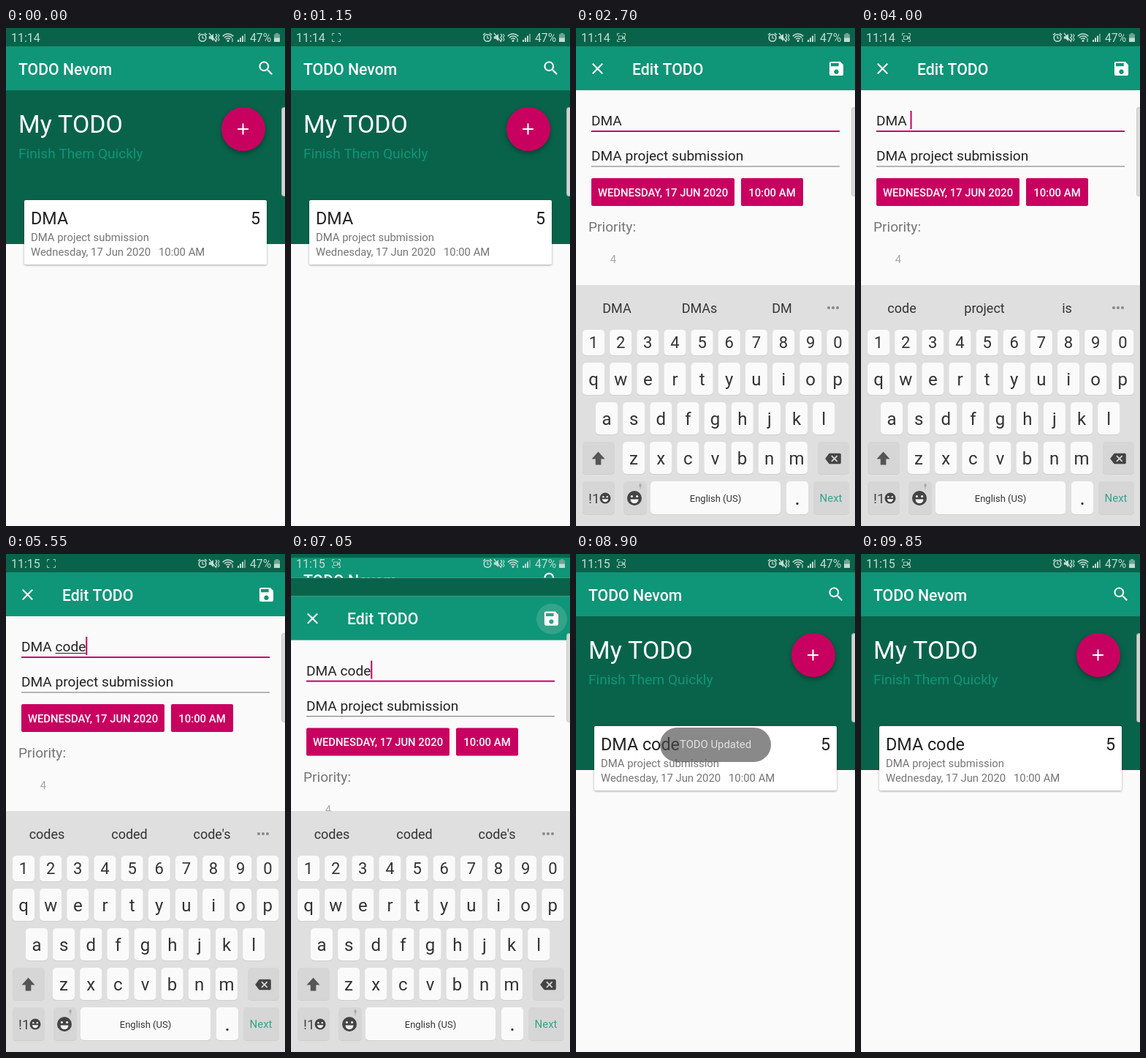
An HTML page with a canvas for the animation above (10 s loop, 382 by 680 pixels).

```html
<!DOCTYPE html>
<html lang="en">
<head>
<meta charset="utf-8">
<title>TODO app</title>
<style>
html, body { margin: 0; width: 100%; height: 100%; overflow: hidden; background: #fafafa; }
canvas { display: block; }
</style>
</head>
<body>
<canvas id="stage" width="382" height="680"></canvas>
<script>
const c = document.getElementById('stage').getContext('2d');
const LOOP = 10000;
const DARK = '#09634a', TEAL = '#0f9577', PINK = '#c80060', PAPER = '#fafafa', GREY = '#757575', INK = '#212121';
const SP = 1.0611; // pixels per density-independent unit

const ICONS = {
  search: 'M15.5 14h-.79l-.28-.27C15.41 12.59 16 11.11 16 9.5 16 5.91 13.09 3 9.5 3S3 5.91 3 9.5 5.91 16 9.5 16c1.61 0 3.09-.59 4.23-1.57l.27.28v.79l5 4.99L20.49 19l-4.99-5zm-6 0C7.01 14 5 11.99 5 9.5S7.01 5 9.5 5 14 7.01 14 9.5 11.99 14 9.5 14z',
  save: 'M17 3H5c-1.11 0-2 .9-2 2v14c0 1.1.89 2 2 2h14c1.1 0 2-.9 2-2V7l-4-4zm-5 16c-1.66 0-3-1.34-3-3s1.34-3 3-3 3 1.34 3 3-1.34 3-3 3zm3-10H5V5h10v4z',
  close: 'M19 6.41L17.59 5 12 10.59 6.41 5 5 6.41 10.59 12 5 17.59 6.41 19 12 13.41 17.59 19 19 17.59 13.41 12z',
  add: 'M19 13h-6v6h-2v-6H5v-2h6V5h2v6h6z',
  alarm: 'M7.88 3.39L6.6 1.86 2 5.71l1.29 1.53zM22 5.72l-4.6-3.86-1.29 1.53 4.6 3.86zM12 4c-4.97 0-9 4.03-9 9s4.02 9 9 9 9-4.03 9-9-4.03-9-9-9zm0 16c-3.87 0-7-3.13-7-7s3.13-7 7-7 7 3.13 7 7-3.13 7-7 7zm1-11h-2v3H8v2h3v3h2v-3h3v-2h-3z',
  back: 'M22 4H7c-.69 0-1.23.35-1.59.88L0 12l5.41 7.11c.36.53.9.89 1.59.89h15c1.1 0 2-.9 2-2V6c0-1.1-.9-2-2-2zm-3 11.59L17.59 17 14 13.41 10.41 17 9 15.59 12.59 12 9 8.41 10.41 7 14 10.59 17.59 7 19 8.41 15.41 12z',
  shift: 'M12 2L21.5 12.5H16V21H8V12.5H2.5z',
  mute: 'M2 9v6h4l6 5V4L6 9z'
};
for (const name in ICONS) ICONS[name] = new Path2D(ICONS[name]);

const clamp = v => Math.max(0, Math.min(1, v));
const span = (t, from, to) => clamp((t - from) / (to - from));
const smooth = p => p * p * (3 - 2 * p);

function rect(x, y, w, h, fill) {
  c.fillStyle = fill;
  c.fillRect(x, y, w, h);
}

function round(x, y, w, h, r, fill) {
  c.fillStyle = fill;
  c.beginPath();
  c.roundRect(x, y, w, h, r);
  c.fill();
}

function disc(x, y, r, fill) {
  c.fillStyle = fill;
  c.beginPath();
  c.arc(x, y, r, 0, 7);
  c.fill();
}

function stroke(color, width, ...points) {
  c.strokeStyle = color;
  c.lineWidth = width;
  c.beginPath();
  points.forEach(([x, y], i) => i ? c.lineTo(x, y) : c.moveTo(x, y));
  c.stroke();
}

function arc(x, y, r, from, to, color, width) {
  c.strokeStyle = color;
  c.lineWidth = width;
  c.beginPath();
  c.arc(x, y, r, from, to);
  c.stroke();
}

// y is the middle of the capitals
function text(s, x, y, size, fill, weight = 400, align = 'left') {
  c.font = `${weight} ${size}px Roboto, sans-serif`;
  c.fillStyle = fill;
  c.textAlign = align;
  c.fillText(s, x, y + size * .355);
  return c.measureText(s).width;
}

function icon(name, x, y, scale, fill) {
  c.save();
  c.translate(x - 12 * scale, y - 12 * scale);
  c.scale(scale, scale);
  c.fillStyle = fill;
  c.fill(ICONS[name], 'evenodd');
  c.restore();
}

function shadowed(blur, dy, draw) {
  c.shadowColor = 'rgba(0,0,0,.35)';
  c.shadowBlur = blur;
  c.shadowOffsetY = dy;
  draw();
  c.shadowColor = 'transparent';
}

function listPage(title) {
  rect(0, 0, 382, 710, PAPER);
  rect(0, 0, 382, 295, DARK);
  rect(0, 25, 382, 60, TEAL);
  text('TODO Nevom', 17, 56, 20 * SP, '#fff', 500);
  icon('search', 356, 55, SP, '#fff');
  text('My TODO', 17, 131, 32 * SP, '#fff');
  text('Finish Them Quickly', 17, 171, 18 * SP, TEAL);
  shadowed(7, 3, () => disc(325, 138, 30, PINK));
  icon('add', 324.5, 138, SP, '#fff');
  shadowed(3, 1, () => round(25, 235, 332, 88, 2, '#fff'));
  text(title, 34, 260, 22 * SP, INK);
  text('5', 348, 260, 22 * SP, INK, 400, 'right');
  text('DMA project submission', 34, 285.5, 14 * SP, GREY);
  text('Wednesday, 17 Jun 2020', 34, 305.5, 14 * SP, GREY);
  text('10:00 AM', 209, 305.5, 14 * SP, GREY);
}

function editPage(t, title) {
  const focused = t >= 2050;
  rect(0, 0, 382, 680, PAPER);
  rect(0, 0, 382, 25, DARK);
  rect(0, 25, 382, 60, TEAL);
  const ripple = span(t, 6600, 6900);
  if (ripple) disc(357, 56, 8 + 13 * ripple, 'rgba(255,255,255,.14)');
  icon('close', 29.5, 55.5, SP, '#fff');
  text('Edit TODO', 77, 56, 20 * SP, '#fff', 500);
  icon('save', 356.5, 55.5, SP, '#fff');

  const width = text(title, 21, 126.5, 18 * SP, INK);
  rect(21, focused ? 140 : 140.5, 340, focused ? 2 : 1, focused ? PINK : GREY);
  if (title.length > 4 && t < 6550) {
    const start = c.measureText('DMA ').width;
    rect(21 + start, 135, width - start, 1, INK);
  }
  if (focused && cursorOn(t)) rect(21 + width, 113, 2, 25, PINK);
  text('DMA project submission', 21, 174.5, 18 * SP, INK);
  rect(21, 188.5, 340, 1, GREY);

  for (const [x, w, label] of [[21, 196, 'WEDNESDAY, 17 JUN 2020'], [226, 85, '10:00 AM']]) {
    round(x, 205, w, 38, 2, PINK);
    text(label, x + w / 2, 224.5, 14 * SP, '#fff', 500, 'center');
  }

  text('Priority:', 17, 271.5, 18 * SP, GREY);
  text('4', 51, 316, 14 * SP, '#a5a5a5', 400, 'center');
  text('5', 51, 380, 14 * SP, INK, 400, 'center');
  text('1', 51, 443, 14 * SP, '#a5a5a5', 400, 'center');
  rect(17, 351, 68, 2, '#8a8a8a');
  rect(17, 404, 68, 2, '#8a8a8a');

  icon('alarm', 27.5, 496, SP, GREY);
  text('Remind Me', 47, 497.5, 16 * SP, GREY);
  round(178, 490, 31, 15, 7.5, '#b8b8b8');
  shadowed(3, 1, () => disc(186, 497.5, 10.5, '#ececec'));
}

// Typing
const TYPED = [[2970, ' '], [4550, 'c'], [4750, 'o'], [4970, 'd'], [5200, 'e']];
const HINTS = [
  ['DMA', 'DMAs', 'DM'], ['code', 'project', 'is'], ['c', 'can', 'code'],
  ['co', 'code', 'come'], ['cod', 'code', 'codes'], ['codes', 'coded', "code's"]
];
const countTyped = t => TYPED.filter(([at]) => at <= t).length;
const titleAt = t => 'DMA' + TYPED.slice(0, countTyped(t)).map(k => k[1]).join('');
const pressed = (t, key) => TYPED.some(([at, k]) => k === key && t >= at - 20 && t < at + 110);

function cursorOn(t) {
  if (t >= 6200) return true;
  const n = countTyped(t), last = n ? TYPED[n - 1][0] : 2050;
  return Math.floor((t - last) / 500) % 2 === 0;
}

function smiley(x, y, r) {
  disc(x, y, r, '#444');
  disc(x - r * .36, y - r * .25, r * .16, '#f4f4f4');
  disc(x + r * .36, y - r * .25, r * .16, '#f4f4f4');
  c.fillStyle = '#f4f4f4';
  c.beginPath();
  c.arc(x, y + r * .15, r * .55, 0, Math.PI);
  c.fill();
}

function keyboard(t) {
  rect(0, 351, 382, 340, '#dfdfdf');
  HINTS[countTyped(t)].forEach((s, i) => text(s, 56 + 113 * i, 383, 18, '#333', 400, 'center'));
  for (const x of [346, 352, 358]) disc(x, 382, 2, '#888');

  const key = (x, y, w, h, fill) => {
    round(x, y + 1, w, h, 5, '#cfcfcf');
    round(x, y, w, h, 5, fill);
  };
  const rows = [['1234567890', 24, 412, 35, 22], ['qwertyuiop', 24, 457, 44, 24],
    ['asdfghjkl', 42, 511, 44, 24], ['zxcvbnm', 79, 565, 44, 24]];
  for (const [chars, x0, y, h, size] of rows) {
    [...chars].forEach((ch, i) => {
      const x = x0 + 37.15 * i;
      key(x - 15, y, 30, h, pressed(t, ch) ? '#c4c4c4' : PAPER);
      text(ch, x, y + h / 2 + (size > 22 ? .5 : 0), size, '#333', 400, 'center');
    });
  }
  const soft = '#d6d6d6';
  key(9, 565, 44, 44, soft);
  icon('shift', 30.5, 588, .95, '#555');
  key(331, 565, 43, 44, soft);
  icon('back', 352, 588, .9, '#444');

  key(9, 619, 44, 45, soft);
  text('!1', 17, 642, 19, '#444');
  smiley(40, 642, 7.5);
  key(65, 619, 32, 45, soft);
  smiley(80, 642, 10);
  round(86.5, 622, 3, 5, 1.5, '#aaa');
  rect(87.5, 627, 1, 3, '#aaa');
  key(102, 619, 178, 45, pressed(t, ' ') ? '#c4c4c4' : PAPER);
  text('English (US)', 191, 642, 13, '#333', 400, 'center');
  key(288, 619, 30, 45, PAPER);
  text('.', 303, 642, 24, '#333', 500, 'center');
  key(325, 619, 49, 45, soft);
  text('Next', 349, 642, 15, '#35a58c', 400, 'center');
}

function recorder(t) {
  const ink = '#a9cabe';
  for (const [sx, sy] of [[-1, -1], [1, -1], [1, 1], [-1, 1]]) {
    const x = 62 + 5.5 * sx, y = 13 + 5.5 * sy;
    stroke(ink, 1, [x - 3 * sx, y], [x, y], [x, y - 3 * sy]);
  }
  const phase = t % 1000;
  if (phase >= 100 && phase < 620) return;
  c.strokeStyle = ink;
  c.strokeRect(58.5, 11, 5, 4.5);
  stroke(ink, 1.4, [64, 13.3], [66.5, 11.5], [66.5, 15], [64, 13.3]);
}

function statusBar(t) {
  const ink = '#c3dcd3';
  text(t < 4500 ? '11:14' : '11:15', 7, 13.5, 16, ink);
  if (t >= 50) recorder(t);

  arc(269, 13.5, 4.8, 0, 7, ink, 1.6);
  stroke(ink, 1.2, [269, 10.5], [269, 14], [271.5, 14]);
  stroke(ink, 1.6, [263, 9.5], [266, 7]);
  stroke(ink, 1.6, [275, 9.5], [272, 7]);

  icon('mute', 284, 13, .62, ink);
  stroke(ink, 1.3, [278, 7], [288, 19]);
  stroke(ink, 1.3, [287, 8], [289, 10.5], [287, 13], [289, 15.5], [287, 18]);
  stroke(ink, 1.1, [290.5, 8], [292, 10.5], [290.5, 13], [292, 15.5], [290.5, 18]);

  for (const r of [4, 7, 10]) arc(304, 18, r, -Math.PI * .76, -Math.PI * .24, ink, 1.5);
  disc(304, 17.5, 1.5, ink);
  stroke(ink, 1.2, [310, 14], [310, 19]);
  for (let i = 0; i < 4; i++) rect(317 + 3 * i, 16 - 2.7 * i, 2, 3 + 2.7 * i, i < 3 ? ink : '#6fa392');

  text('47%', 334, 13.5, 15.7, ink);
  rect(369, 7, 4, 2, '#6fa392');
  rect(367, 8.5, 8, 10.5, '#6fa392');
  rect(367, 13.5, 8, 5.5, ink);
}

function toast(t) {
  const alpha = span(t, 7250, 7550) * (1 - span(t, 8750, 9350));
  if (!alpha) return;
  c.globalAlpha = alpha;
  round(115, 237, 152, 47, 23.5, 'rgba(76,76,76,.88)');
  text('TODO Updated', 191, 260, 14 * SP, '#fff', 400, 'center');
  c.globalAlpha = 1;
}

function shifted(dy, draw) {
  c.save();
  c.translate(0, dy);
  draw();
  c.restore();
}

function render(t) {
  const title = titleAt(t);
  const listShift = t < 6900 ? 0 : -20 * (1 - span(t, 7050, 7300));
  shifted(listShift, () => listPage(t < 6900 ? 'DMA' : title));

  if (t >= 1450 && t < 7200) {
    const rise = 54 * (1 - span(t, 1450, 1800)) ** 2;
    const drop = 54 * span(t, 6900, 7150);
    c.globalAlpha = span(t, 1420, 1600) * (1 - span(t, 7060, 7200));
    shifted(rise + drop, () => editPage(t, title));
    c.globalAlpha = 1;
  }

  const kb = smooth(span(t, 2150, 2550)) * (1 - smooth(span(t, 7100, 7400)));
  if (kb) shifted(329 * (1 - kb), () => keyboard(t));

  toast(t);
  statusBar(t);
  round(377, 108, 8, 122, 4, 'rgba(190,190,190,.8)');
  round(378, 109, 8, 120, 3, 'rgba(222,222,222,.8)');
}

const start = performance.now();
function tick() {
  render((performance.now() - start) % LOOP);
  requestAnimationFrame(tick);
}
tick();
</script>
</body>
</html>
```
